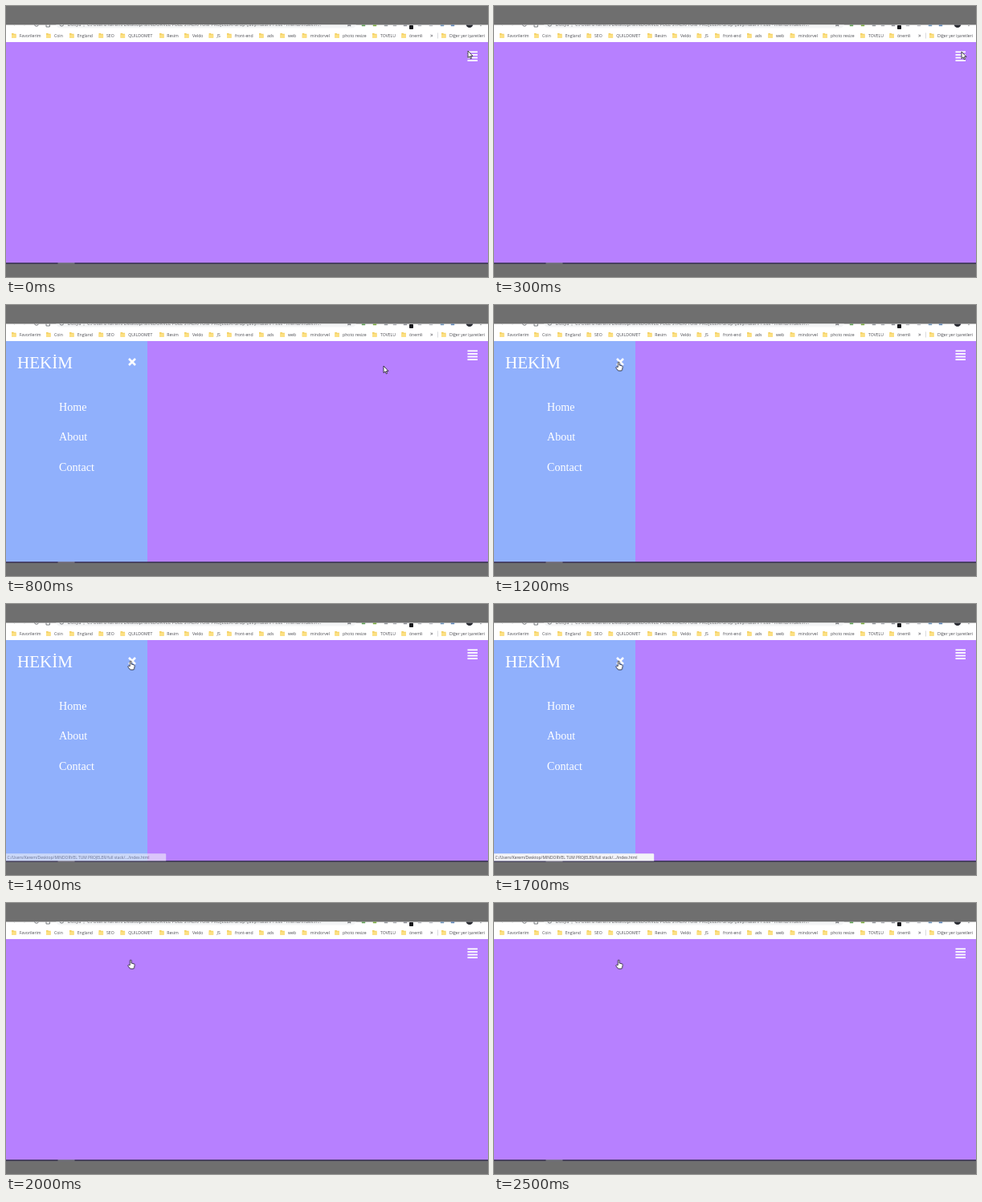
These frames come from a looping animation (600x338 px, 2.8 s). An HTML page:

```html
<!DOCTYPE html>
<html lang="tr">
<head>
<meta charset="utf-8">
<title>Side menu</title>
<style>
html, body { margin: 0; width: 100%; height: 100%; overflow: hidden; background: #6f6f6f; }
svg { display: block; width: 100vw; height: 100vh; }
.ui { font-family: "Open Sans", "Noto Sans", sans-serif; font-size: 5.15px; fill: #4c4d52; }
.menu { font-family: "Liberation Serif", "Times New Roman", serif; font-size: 14.1px; fill: #fff; }
.menu .brand { font-size: 21px; }

#menu, #status, #cursor, #arrow, #hand { animation: 2800ms step-end infinite; }
#menu { animation-name: menu; }
#status { animation-name: status; }
#cursor { animation-name: travel; }
#arrow { animation-name: arrow; }
#hand { animation-name: hand; }

@keyframes menu {
  0% { opacity: 0; }
  14.1% { opacity: 1; }
  64.1%, 100% { opacity: 0; }
}
@keyframes status {
  0% { opacity: 0; }
  49.8% { opacity: .6; }
  53.4% { opacity: 1; }
  64.1% { opacity: .78; }
  67.7% { opacity: .3; }
  71.3%, 100% { opacity: 0; }
}
@keyframes travel {
  0% { transform: translate(575px, 56px); }
  3.4% { transform: translate(577px, 56.3px); }
  7% { transform: translate(580px, 56.7px); }
  10.5% { transform: translate(582px, 57px); }
  24.8% { transform: translate(550px, 62px); }
  28.4% { transform: translate(470px, 76px); }
  32% { transform: translate(335px, 88px); }
  35.5% { transform: translate(225px, 85px); }
  39.1% { transform: translate(161px, 74px); }
  42.7%, 100% { transform: translate(155.2px, 71px); }
}
@keyframes arrow {
  0% { opacity: 1; }
  39.1%, 100% { opacity: 0; }
}
@keyframes hand {
  0% { opacity: 0; }
  39.1%, 100% { opacity: 1; }
}
</style>
</head>
<body>
<svg viewBox="0 0 600 338" preserveAspectRatio="none">
  <defs>
    <clipPath id="window"><rect y="23.5" width="600" height="298"/></clipPath>
    <g id="folder">
      <path d="M0 0h2.3l.7.8h2.6v5H0z" fill="#f3d062"/>
      <path d="M0 1.7h5.6v4.1H0z" fill="#fce083"/>
    </g>
  </defs>

  <rect width="600" height="338" fill="#6f6f6f"/>

  <g clip-path="url(#window)">
    <rect y="23" width="600" height="22" fill="#fff"/>

    <!-- toolbar -->
    <rect x="62" y="16" width="374" height="11.6" rx="5.8" fill="#f4f5f6"/>
    <g fill="none" stroke="#66696e" stroke-width=".9">
      <path d="M8 22l2.4 2.4M25.4 22L23 24.4" stroke="#a5a7aa"/>
      <path d="M35.2 22.5a2.8 2.8 0 0 0 5.4 1"/>
      <path d="M50 22v4h4.4v-4"/>
      <circle cx="69.3" cy="22.6" r="2.5"/>
      <path d="M97 20v6" stroke="#b5b7ba"/>
    </g>
    <g class="ui" style="font-size:5.9px">
      <text x="76.5" y="25">Dosya</text>
      <text x="101" y="25">C:/Users/Kerem/Desktop/MINDORVEL FULL STACK/TUM PROJELER/Grup çalışmaları/1.css - menu/index.h...</text>
    </g>
    <path d="M425 22l.5 3.4 1.8-1 1.8 1 .5-3.4z" fill="#66696e"/>
    <g id="tools"></g>
    <rect x="502" y="24" width="5" height="5" rx=".8" fill="#17181c"/>
    <circle cx="577" cy="22.7" r="4.4" fill="#2b2d34"/>
    <circle cx="591" cy="24.6" r=".7" fill="#5f6368"/>

    <!-- bookmarks -->
    <g id="marks" class="ui"></g>
    <text class="ui" x="528" y="38.8" style="font-size:7px">»</text>
    <path d="M537.5 33.5v7" stroke="#c9cbce" stroke-width=".7"/>

    <!-- page -->
    <rect y="45" width="600" height="275.5" fill="#b780ff"/>
    <g id="bars" fill="#fff"></g>
    <g id="menu" class="menu">
      <rect y="45" width="176" height="275.5" fill="#90b0fc"/>
      <text class="brand" x="14" y="79">HEKİM</text>
      <path d="M153 67l8 8M161 67l-8 8" stroke="#fff" stroke-width="2.5"/>
      <text x="66" y="132">Home</text>
      <text x="66" y="169.3">About</text>
      <text x="66" y="206.7">Contact</text>
    </g>

    <rect y="320.2" width="600" height="1.4" fill="#332c50"/>
    <rect x="64.5" y="320.2" width="21" height="1.4" fill="#85838f"/>

    <g id="status">
      <path d="M0 311.3h198q1.2 0 1.2 1.2v8H0z" fill="#f3f3f7"/>
      <text class="ui" x="1.5" y="318" style="font-size:4.95px">C:/Users/Kerem/Desktop/MINDORVEL TUM PROJELER/full stack/.../index.html</text>
    </g>
  </g>

  <g id="cursor" fill="#fff" stroke="#16161c" stroke-width=".8" stroke-linejoin="round">
    <path id="arrow" d="M0 0V8.6L2 6.8 3.3 9.8 4.6 9.2 3.3 6.4H6z"/>
    <path id="hand" d="M-.9 6.5V.9a.9.9 0 0 1 1.8 0V4l3.2.9q1 .3.9 1.4l-.5 2.7-.8 2H-.6L-3.2 7.6q-.5-1 .6-1.3z"/>
  </g>
</svg>

<script>
const fill = (id, html) => { document.getElementById(id).innerHTML = html; };

// folder x, label x, label
const marks = [
  [7, 16.7, 'Favorilerim'], [50, 60, 'Coin'], [79, 88.7, 'England'],
  [115.5, 125, 'SEO'], [142.5, 152.3, 'QUILDOMET'], [191, 200.3, 'Resim'],
  [222, 232, 'Veldo'], [252.6, 262.6, 'JS'], [275, 285, 'front-end'],
  [315, 325, 'ads'], [341.3, 351, 'web'], [368.7, 378.7, 'mindorvel'],
  [409.3, 419, 'photo resize'], [456, 466, 'TOVELU'], [492.3, 502, 'önemli'],
  [542, 552, 'Diğer yer işaretleri']
];
fill('marks', marks.map(([fx, tx, label]) =>
  `<use href="#folder" x="${fx}" y="34"/><text x="${tx}" y="38.8">${label}</text>`).join(''));

const tools = [[445, '#5f9d54'], [459, '#79a83f'], [473, '#92959a'], [484, '#a9abb0'],
  [497, '#8b8e94'], [515, '#b3b5ba'], [529, '#b9bbc0'], [543, '#6f93b8'], [556, '#5d84b5']];
fill('tools', tools.map(([x, color]) =>
  `<rect x="${x - 2.2}" y="21" width="4.4" height="4.2" fill="${color}"/>`).join(''));

fill('bars', [0, 1, 2, 3].map(i =>
  `<rect x="574.5" y="${56.4 + i * 3.6}" width="12.5" height="1.8"/>`).join(''));
</script>
</body>
</html>
```
